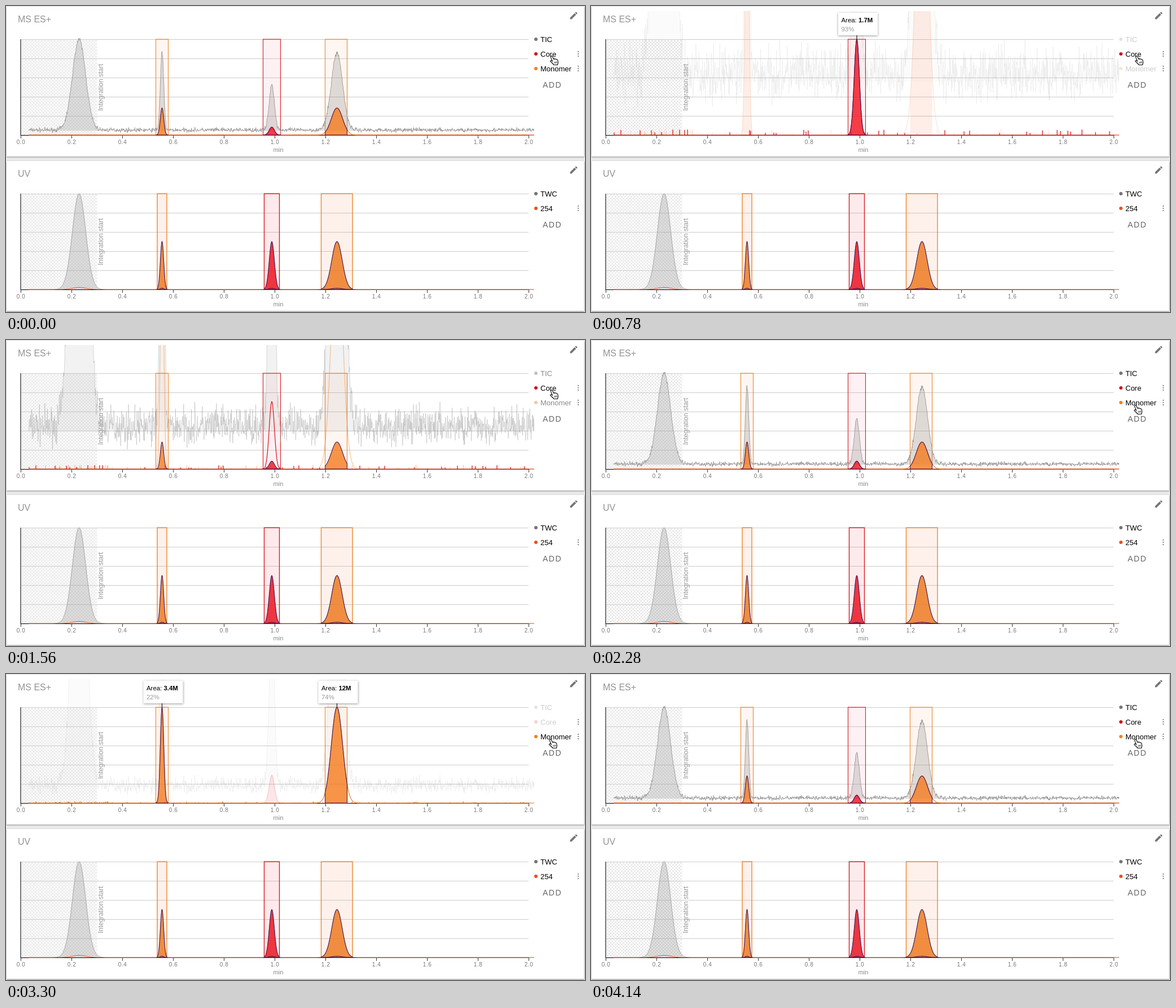
These frames come from a looping animation (1026x543 px, 4200 ms). An HTML page with a canvas:

```html
<!DOCTYPE html>
<html lang="en">
<head>
<meta charset="utf-8">
<title>Chromatogram</title>
<style>
html, body { margin: 0; width: 100%; height: 100%; overflow: hidden; background: #eee; }
canvas { display: block; }
</style>
</head>
<body>
<canvas id="stage" width="1026" height="543"></canvas>
<script>
const ctx = document.getElementById('stage').getContext('2d');
const LOOP = 4200, TWEEN = 500, BASE = 229, LEFT = 26.5, FONT = '"Liberation Sans", Arial, sans-serif';
const GREY = '117,117,117', RUST = '232,80,30';
const RED = { line: '214,20,26', fill: '244,16,28', tint: '230,30,50' };
const ORANGE = { line: '236,130,36', fill: '246,124,30', tint: '240,100,40' };

// [centre, height, sigma, left and right edge of the integration box]
const coreMS = [[471, 14, 4.6, 455.5, 486.5]];
const monoMS = [[276.5, 48, 3, 265.5, 287.5], [586.5, 48, 10, 565.5, 604.5]];
const coreUV = [[471, 85, 4.5, 457.5, 484.5]];
const monoUV = [[276.5, 85, 2.9, 268, 285], [586.5, 85, 9.3, 558.5, 614]];
const ticPeaks = [[129.5, 161, 11.7], [276.5, 137, 3], [471, 81, 4.6], [586.5, 137, 10]];
const twcPeaks = [[129.5, 170, 11.8], ...coreUV, ...monoUV];

const phases = [
  { on: 270, off: 1345, who: 1, zoom: 170 / 14, tips: [[471, '1.7M', '93%']] },
  { on: 2400, off: 3565, who: 2, zoom: 170 / 48, tips: [[276.5, '3.4M', '22%'], [586.5, '12M', '74%']] }
];

let seed = 7;
const rnd = () => (seed = (seed * 16807) % 2147483647) / 2147483647;
const noise = Array.from({ length: 1495 }, () => (rnd() + rnd() + rnd() - 1.5) * 3.8);
const redSpikes = [41, 53, 87, 107, 113, 125, 145, 157, 166, 171, 246, 281, 283, 309, 324, 328, 377, 381, 385,
  461, 485, 490, 510, 519, 543, 556, 627, 661, 671, 724, 772, 778, 800, 826, 832, 845, 850, 870, 894, 919]
  .map(x => [x, 0.3 + 0.5 * rnd()]);
const orangeSpikes = Array.from({ length: 90 }, (_, i) =>
  [i < 35 ? 78 + rnd() * 110 : 40 + rnd() * 890, 0.2 + 0.7 * rnd() ** 2]);

const clamp = v => Math.max(0, Math.min(1, v));
const ease = v => (v = clamp(v)) < 0.5 ? 4 * v ** 3 : 1 - 4 * (1 - v) ** 3;
const rgba = (c, a) => `rgba(${c},${a})`;
const gauss = (x, peaks) => peaks.reduce((sum, [c, h, s]) => sum + h * Math.exp(-((x - c) ** 2) / (2 * s * s)), 0);

function line(x1, y1, x2, y2, color, width = 1) {
  ctx.strokeStyle = color;
  ctx.lineWidth = width;
  ctx.beginPath();
  ctx.moveTo(x1, y1);
  ctx.lineTo(x2, y2);
  ctx.stroke();
}

function text(str, x, y, size, color, align = 'left', weight = '', spacing = 0) {
  ctx.font = `${weight} ${size}px ${FONT}`;
  ctx.letterSpacing = spacing + 'px';
  ctx.textAlign = align;
  ctx.fillStyle = color;
  ctx.fillText(str, x, y);
}

function dot(x, y, r, color) {
  ctx.fillStyle = color;
  ctx.beginPath();
  ctx.arc(x, y, r, 0, 7);
  ctx.fill();
}

function trace(f, x1, x2, step) {
  ctx.beginPath();
  for (let i = 0, x = x1; x <= x2; x = x1 + ++i * step) ctx.lineTo(x, BASE - f(x, i));
}

function curve(f, color, width, step = 0.6) {
  trace(f, 40, 936, step);
  ctx.strokeStyle = color;
  ctx.lineWidth = width;
  ctx.stroke();
}

function spikes(list, zoom, color) {
  for (const [x, h] of list) line(x, BASE, x, BASE - h * zoom, color, 1.3);
}

function box([, , , x1, x2], color, tint, width) {
  ctx.fillStyle = rgba(color.tint, tint);
  ctx.fillRect(x1, 59, x2 - x1, 170);
  ctx.strokeStyle = rgba(color.line, 0.95);
  ctx.lineWidth = width;
  ctx.strokeRect(x1, 59, x2 - x1, 170);
}

function area(peak, fill, zoom, outline) {
  const [, , , x1, x2] = peak;
  trace(x => zoom * gauss(x, [peak]), x1, x2, 0.5);
  ctx.lineTo(x2, BASE);
  ctx.lineTo(x1, BASE);
  ctx.closePath();
  ctx.fillStyle = fill;
  ctx.fill();
  if (!outline) return;
  ctx.strokeStyle = '#4a1c5c';
  ctx.lineWidth = 1.1;
  ctx.stroke();
}

function card(title) {
  ctx.save();
  ctx.shadowColor = 'rgba(0,0,0,.4)';
  ctx.shadowBlur = 3;
  ctx.shadowOffsetY = 1;
  ctx.fillStyle = '#fff';
  ctx.fillRect(1, 1, 1023.5, 266);
  ctx.restore();
  text(title, 21, 29, 16, '#949494');
  ctx.save();
  ctx.translate(997.4, 8.4);
  ctx.scale(0.72, 0.72);
  ctx.fillStyle = '#757575';
  ctx.fill(pencil);
  ctx.restore();
}

function hatch() {
  const gap = 4 * Math.SQRT2;
  ctx.save();
  ctx.beginPath();
  ctx.rect(27, 59, 134.5, 170);
  ctx.clip();
  for (let x = LEFT - 32 * gap; x < 340; x += gap) {
    line(x, 59, x + 171, 230, '#d6d6d6', 0.8);
    line(x, 59, x - 171, 230, '#d6d6d6', 0.8);
  }
  ctx.restore();
}

function plotBack() {
  for (let y = 59.5; y < 229; y += 34) line(26, y, 926, y, '#ccc');
  hatch();
  line(26, 59, 26, 230, '#777', 2);
  line(26, 229.5, 927, 229.5, '#000');
  for (let i = 0; i <= 10; i++) {
    const x = LEFT + 90 * i;
    line(x, 229, x, 235, '#333');
    text((i / 5).toFixed(1), x, 245, 10, '#777', 'center', '', 0.5);
  }
  text('min', 482.5, 259, 11.2, '#888', 'center');
}

function startLabel() {
  ctx.save();
  ctx.translate(171.5, 186);
  ctx.rotate(-Math.PI / 2);
  text('Integration start', 0, 0, 12, '#999');
  ctx.restore();
}

function legend(rows) {
  rows.forEach(([name, color, alpha], i) => {
    const y = 59 + 26 * i;
    ctx.globalAlpha = alpha;
    dot(939, y, 3, rgba(color, 1));
    text(name, 947, y + 5, 13, '#000');
    ctx.globalAlpha = 1;
    if (i) for (const d of [-4, 0, 4]) dot(1014, y + d, 1.15, '#8a8a8a');
  });
  text('ADD', 951, 67 + 26 * rows.length, 14, '#666', 'left', '', 1.5);
}

function tooltip([x, amount, share]) {
  line(x, 50, x, 60, '#222', 1.2);
  ctx.save();
  ctx.shadowColor = 'rgba(0,0,0,.4)';
  ctx.shadowBlur = 4;
  ctx.shadowOffsetY = 1;
  ctx.fillStyle = '#fff';
  ctx.fillRect(x - 33, 12, 70, 40);
  ctx.restore();
  text('Area: ', x - 27.5, 29, 11.4, '#000');
  text(amount, x - 27.5 + ctx.measureText('Area: ').width, 29, 11.4, '#000', 'left', 'bold');
  text(share, x - 27.5, 45, 11.4, '#999');
}

const pencil = new Path2D('M3 17.25V21h3.75L17.8 9.94l-3.75-3.75zM20.7 7.04a1 1 0 0 0 0-1.41l-2.34-2.34a1 1 0 0 0-1.41 0l-1.83 1.83 3.75 3.75z');
const hand = new Path2D('M2.5 1.2C3.5.5 4.6 1 5 2L6.8 6.2C7.4 5.4 9 5.5 9.5 6.4 10.3 5.7 11.6 6 12 7 13 6.6 14 7.2 14.2 8.4L14.8 12C15 13.6 14 14.4 13.8 16.5H7.2C6.6 14.6 4 13.2 1.4 10.6.4 9.4 1.6 8.3 3 9L4.6 10 2 3.4C1.6 2.5 1.8 1.6 2.5 1.2Z');
const knuckles = new Path2D('M8.2 11.2L9 14M10.2 10.8L10.8 13.8M12.2 10.4L12.6 13.4');

function cursor(t) {
  const k = ease((t - 1900) / 320);
  ctx.save();
  ctx.translate(963.5 - 2 * k, 88 + 27 * k);
  ctx.fillStyle = '#fff';
  ctx.fill(hand);
  ctx.strokeStyle = '#000';
  ctx.lineWidth = 1.1;
  ctx.stroke(hand);
  ctx.lineWidth = 0.8;
  ctx.stroke(knuckles);
  ctx.restore();
}

function massPanel(t) {
  const { on, off, who, zoom: full, tips } = phases[t < 2300 ? 0 : 1];
  const active = t >= on && t < off;
  const k = ease((t - on) / TWEEN) - ease((t - off) / TWEEN);
  const zoom = 1 + (full - 1) * k, dim = 1 - 0.8 * k, ticAlpha = 1 - 0.87 * k;
  const groups = [[coreMS, RED, 1, redSpikes], [monoMS, ORANGE, 2, orangeSpikes]];
  const alpha = id => id === who ? 1 : dim;

  card('MS ES+');
  plotBack();
  ctx.save();
  ctx.beginPath();
  ctx.rect(20, 9, 916, 221.5);
  ctx.clip();
  for (const [peaks, color, id] of groups)
    if (!active || id === who) for (const p of peaks) box(p, color, 0.06, 1.1);

  curve((x, i) => zoom * (9 + noise[i] + gauss(x, ticPeaks)), `rgba(145,145,145,${0.95 * ticAlpha})`, 0.85);
  ctx.fillStyle = `rgba(128,128,128,${0.25 * ticAlpha})`;
  ctx.fill();

  for (const [peaks, color, id, list] of groups) {
    const stroke = rgba(color.line, alpha(id));
    curve(x => zoom * gauss(x, peaks), stroke, 1.2);
    spikes(list, zoom, stroke);
  }
  for (const [peaks, color, id] of groups) {
    const faded = active && id !== who;
    const fill = faded ? rgba(color.tint, 0.11) : rgba(color.fill, 0.8);
    for (const p of peaks) area(p, fill, active ? full : 1, !faded);
  }
  ctx.restore();
  startLabel();
  legend([['TIC', GREY, dim], ['Core', RED.line, alpha(1)], ['Monomer', ORANGE.line, alpha(2)]]);
  if (active) tips.forEach(tooltip);
}

function uvPanel() {
  card('UV');
  plotBack();
  const groups = [[coreUV, RED], [monoUV, ORANGE]];
  for (const [peaks, color] of groups) for (const p of peaks) box(p, color, 0.09, 1.4);
  curve(x => gauss(x, twcPeaks), '#aaa', 1);
  ctx.fillStyle = 'rgba(128,128,128,.25)';
  ctx.fill();
  curve(x => gauss(x, [[129.5, 3.6, 12]]), rgba(RUST, 0.8), 1.1);
  for (const [peaks, color] of groups)
    for (const p of peaks) {
      area(p, rgba(color.fill, 0.8), 1, true);
      area(p, rgba(color.fill, 0.5), 0.025, true);
    }
  startLabel();
  legend([['TWC', GREY, 1], ['254', RUST, 1]]);
}

function frame(now) {
  const t = now % LOOP;
  ctx.fillStyle = '#ececec';
  ctx.fillRect(0, 0, 1026, 543);
  massPanel(t);
  ctx.save();
  ctx.translate(0, 274);
  uvPanel();
  ctx.restore();
  cursor(t);
  requestAnimationFrame(frame);
}
requestAnimationFrame(frame);
</script>
</body>
</html>
```
